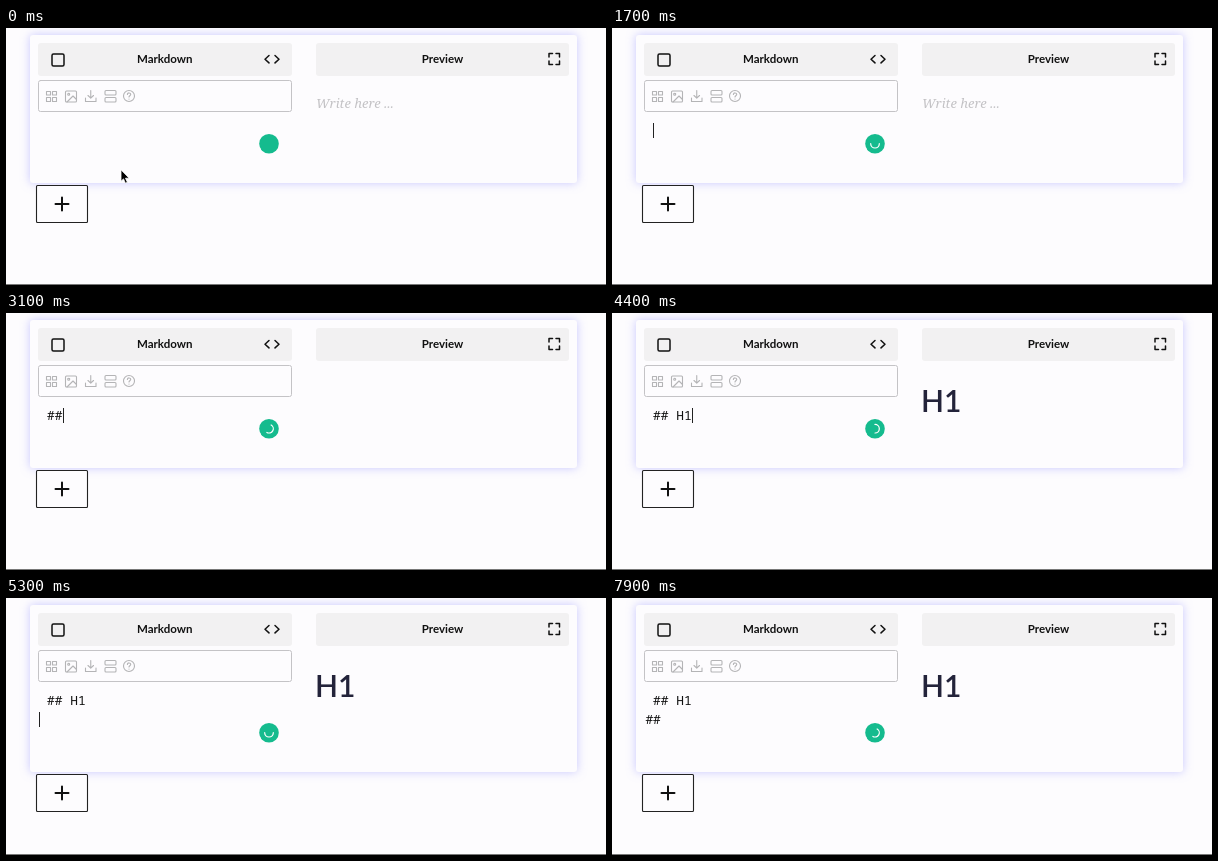
An HTML page for the animation above (8 s loop, 600 by 257 pixels).

```html
<!DOCTYPE html>
<html lang="en">
<head>
<meta charset="utf-8">
<title>Markdown editor</title>
<style>
  html, body { margin: 0; width: 100%; height: 100%; overflow: hidden; background: #fdfcfe; }
  #stage { position: relative; width: 600px; height: 257px; overflow: hidden; }
  #card {
    position: absolute; left: 24px; top: 7px; width: 547px; height: 148px;
    border-radius: 3px; background: #fdfcfe; box-shadow: 0 0 10px rgba(150, 150, 255, .5);
  }
  svg { position: absolute; left: 0; top: 0; fill: none; stroke-linecap: round; stroke-linejoin: round; }
  text { stroke: none; white-space: pre; }
  .head { font: 700 11.5px Lato, sans-serif; fill: #111; text-anchor: middle; }
  .bar { fill: #f2f1f2; }
  .dark { stroke: #111; stroke-width: 1.5; }
  .tools { stroke: #b4b4b6; stroke-width: 1.1; }
  .code { font: 500 12.9px "Noto Sans Mono", monospace; fill: #111; }
  #hint { font: italic 13px "Noto Serif", serif; fill: #c3c2c5; }
  #title { font: 600 30px Lato, sans-serif; fill: #23233a; }
</style>
</head>
<body>
<div id="stage">
  <div id="card"></div>
  <svg width="600" height="257" viewBox="0 0 600 257">
    <rect class="bar" x="32" y="15" width="254" height="33" rx="3"/>
    <rect class="bar" x="310" y="15" width="253" height="33" rx="3"/>
    <text class="head" x="158.7" y="35">Markdown</text>
    <text class="head" x="436.5" y="35">Preview</text>

    <g class="dark">
      <rect x="46" y="26" width="12" height="12" rx="1.5"/>
      <path d="M263 27.5l-4 3.7 4 3.7M269 27.5l4 3.7-4 3.7"/>
      <path d="M543 29v-3.5h3.5M550 25.5h3.5v3.5M553.5 33v3.5h-3.5M546.5 36.500h-3.500v-3.500"/>
    </g>

    <rect x="32.500" y="52.500" width="253" height="31" rx="2" stroke="#c4c3c6"/>
    <g class="tools">
      <path d="M40.500 63.500h4v3.500h-4zM46.500 63.500h4v3.500h-4zM40.500 69.500h4v4h-4zM46.500 69.500h4v4h-4z"/>
      <rect x="59.500" y="63" width="11" height="11" rx="1"/>
      <circle cx="62.700" cy="66.200" r="1"/>
      <path d="M61 74l6-6 3.500 3.500"/>
      <path d="M79.500 70v3.500h10.500v-3.500M84.750 62.500v7.500M82 67.500l2.750 2.700 2.750-2.700"/>
      <rect x="99" y="62.500" width="11" height="4.500" rx="1"/>
      <rect x="99" y="69.500" width="11" height="4.500" rx="1"/>
      <circle cx="123" cy="68" r="5.500"/>
      <path d="M121.400 66.500c0-2.200 3.400-2 3.300 0 0 1.200-1.700 1.300-1.700 2.500M123 71v.1"/>
    </g>

    <text class="code" id="line0" x="33.400" y="107"></text>
    <text class="code" id="line1" x="33.400" y="126"></text>
    <path id="caret" d="M.5 95v15" stroke="#222" stroke-linecap="butt"/>

    <text id="hint" x="310" y="80">Write here ...</text>
    <text id="title" x="309" y="98.500"></text>

    <g id="below">
      <circle cx="263" cy="115.700" r="9.800" fill="#15bb8e"/>
      <path id="spin" d="M4.300 0A4.300 4.300 0 0 1-4.300 0" stroke="#fff" stroke-width="1.200"/>
      <rect x="30.500" y="157.500" width="51" height="37" rx="1" fill="#fdfcfe" stroke="#222" stroke-width="1.100"/>
      <path d="M49.500 176h13M56 169.500v13" stroke="#111" stroke-width="2"/>
    </g>

    <path id="arrow" d="M0 0v11.200l2.500-2.300 1.900 4.300 2-.9-1.900-4.100h3.500z" fill="#000" stroke="#fff" stroke-width=".8"/>
    <path id="beam" d="M-2.500-6.500q2.500 0 2.500 1.500v10q0 1.500-2.500 1.500M2.500-6.500q-2.500 0-2.500 1.500M0 5q0 1.500 2.500 1.500" stroke="#222"/>
    <path d="M0 256.500h600" stroke="#777"/>
  </svg>
</div>
<script>
const LOOP = 8000, LINE = 19, CHAR = 7.75, BLINK = 500;
const CLICK = 400, TYPING = 1400, HIDE = 1200;
const $ = id => document.getElementById(id);
const show = (id, on) => { $(id).style.display = on ? '' : 'none'; };
const move = (id, x, y, turn = 0) =>
  $(id).setAttribute('transform', `translate(${x} ${y}) rotate(${turn})`);

// Editor contents from each time on.
const edits = [
  [CLICK, ''], [TYPING, ' '], [2700, ' #'], [2900, ' ##'], [3400, ' ## '],
  [3800, ' ## H'], [4100, ' ## H1'], [4700, ' ## H1\n'], [4900, ' ## H1\n\n'],
  [5250, ' ## H1\n'], [6900, ' ## H1\n#'], [7050, ' ## H1\n##']
];

function drawPointer(t) {
  const p = Math.min(t / CLICK, 1), e = p * p * (3 - 2 * p);
  const x = 115 - 18.500 * e, y = 142 - 35 * e;
  const inText = y < 130;
  show('arrow', !inText);
  show('beam', inText && t < HIDE);
  move('arrow', x, y);
  move('beam', x, y);
}

function draw(t) {
  const edit = edits.filter(([at]) => at <= t).pop();
  const [since, text] = edit || [0, ''];
  const lines = text.split('\n'), row = lines.length - 1;

  $('line0').textContent = lines[0];
  $('line1').textContent = lines[1] || '';
  show('caret', edit && (t - since) % (2 * BLINK) < BLINK);
  move('caret', Math.round(33.400 + lines[row].length * CHAR), row * LINE);

  const heading = text.match(/## (\w+)/);
  $('title').textContent = heading ? heading[1] : '';
  show('hint', !text.trim());

  $('card').style.height = 148 + row * LINE + 'px';
  move('below', 0, row * LINE);
  show('spin', t >= TYPING);
  move('spin', 263, 115.700, -60 - (t - 3100) * 0.3);
  drawPointer(t);
}

function frame() {
  draw(performance.now() % LOOP);
  requestAnimationFrame(frame);
}
frame();
</script>
</body>
</html>
```
